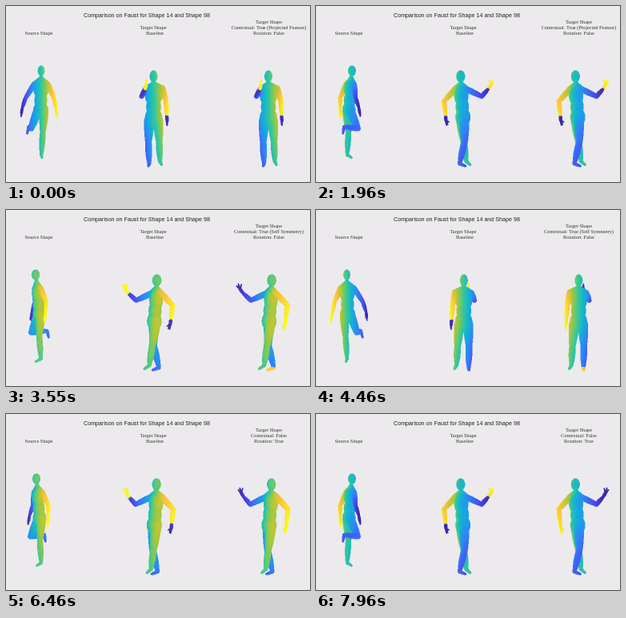
An HTML page with a canvas for the animation above (8000 ms loop, 380x220 px).

```html
<!DOCTYPE html>
<html lang="en">
<head>
<meta charset="utf-8">
<title>Shape comparison</title>
<style>
  html, body { margin: 0; width: 100%; height: 100%; overflow: hidden; background: #eceaec; }
  canvas, svg { position: absolute; left: 0; top: 0; width: 380px; height: 220px; }
  text { font: 6.38px "Liberation Serif", serif; fill: #333; text-anchor: middle; }
  .title { font: 7.16px "Liberation Sans", sans-serif; fill: #222; }
</style>
</head>
<body>
<canvas width="760" height="440"></canvas>
<svg viewBox="0 0 380 220">
  <text class="title" x="176" y="13.8">Comparison on Faust for Shape 14 and Shape 98</text>
  <text x="41" y="35.6">Source Shape</text>
  <text x="184" y="28.8">Target Shape</text>
  <text x="186" y="35.6">Baseline</text>
  <text x="328.5" y="22">Target Shape</text>
  <text id="contextual" x="328.5" y="28.8"></text>
  <text id="rotation" x="328.5" y="35.6"></text>
</svg>
<script>
const LOOP = 8000, TURN = 3000, FPS = 24, SS = 2;
const WIDTH = 380 * SS, HEIGHT = 220 * SS;

// Joints are [x, y, z]: x from the turning axis, y on screen, z towards the viewer at angle 0.
const striding = {
  scale: 0.88,
  head: [2.5, 81, 6], neck: [2.5, 90, 5], chest: [2.3, 104, 3], belly: [2, 118, 2], pelvis: [2, 130, 1],
  shoulderR: [-6.5, 98, 3], elbowR: [-17, 115, -2], wristR: [-21, 127, 0], palmR: [-22, 133, 0.5],
  tipR: [-22.5, 138, 1], indexR: [-22.5, 137, 2], thumbR: [-21, 135, 3],
  shoulderL: [11, 98, 3], elbowL: [18.5, 115, -1], wristL: [21, 128, 1], palmL: [22, 134, 2],
  tipL: [23, 140, 3], indexL: [22.5, 139, 4], thumbL: [21.5, 136, 5],
  hipR: [-3, 134, 1], kneeR: [-10, 153, 6], ankleR: [-13, 151, -17], toeR: [-15, 159, -20],
  hipL: [6, 134, 1], kneeL: [4.5, 157, 2], ankleL: [2.8, 186, -1], toeL: [3.5, 189.5, 6]
};
const reaching = {
  scale: 1,
  head: [0, 88, -4.5], neck: [0, 97, -4], chest: [0, 112, -3.5], belly: [0, 126, -2], pelvis: [0, 139, -1],
  shoulderR: [-9.5, 104, -2], elbowR: [-15, 113, 17], wristR: [-10.5, 104, 30], palmR: [-9.5, 99, 34.5],
  tipR: [-9, 95, 39.5], indexR: [-9.5, 92.5, 37], thumbR: [-9, 93, 33],
  shoulderL: [11, 103, -4], elbowL: [15.5, 119, -19], wristL: [16.5, 137, -16], palmL: [17, 143, -15],
  tipL: [17, 149, -14], indexL: [16.5, 148, -12.5], thumbL: [16, 145, -11],
  hipR: [-5.5, 143, -3], kneeR: [-6.5, 169, -3], ankleR: [-5.5, 197, -10], toeR: [-6.5, 200, -2],
  hipL: [5.5, 143, 0], kneeL: [7, 169, 5], ankleL: [8, 194, 9.5], toeL: [10, 198.5, 17]
};

const ellipsoids = [
  ["head", 4.9, 7.6, 5.9], ["chest", 10.8, 14, 8], ["belly", 9.3, 13, 7.8], ["pelvis", 10.8, 12, 8.8]
];
// start, end, start radius, end radius, bulge
const limbs = [
  ["neck", "shoulder", 3, 3.8, 0], ["shoulder", "elbow", 3.9, 2.9, 0.4], ["elbow", "wrist", 2.9, 1.9, 0.5],
  ["wrist", "palm", 1.9, 2.1, 0.2], ["palm", "tip", 1.7, 0.9, 0], ["palm", "index", 1.6, 0.8, 0],
  ["palm", "thumb", 1.4, 0.8, 0],
  ["hip", "knee", 6.3, 4.2, 0.5], ["knee", "ankle", 4, 2.4, 1], ["ankle", "toe", 2.5, 1.7, 0]
];

const mix = (a, b, t) => a + (b - a) * t;
const mixPoint = (p, q, t) => p.map((v, i) => mix(v, q[i], t));

// A body is a list of ellipsoids; "tint" is the lateral position of the same spot in the striding pose.
function buildBody(pose) {
  const k = pose.scale, balls = [];
  const add = (part, pos, radii, tint) => balls.push({ part, pos, radii: radii.map(r => r * k), tint });
  for (const [name, ...radii] of ellipsoids) add(name, pose[name], radii, striding[name][0]);
  add("neck", pose.neck, [3, 5, 3], striding.neck[0]);
  for (const side of "RL") {
    for (const [from, to, r0, r1, bulge] of limbs) {
      const start = from === "neck" ? from : from + side, end = to + side;
      const p = pose[start], q = pose[end];
      const steps = Math.ceil(Math.hypot(...p.map((v, i) => v - q[i])) / 0.9);
      const part = from === "wrist" || from === "palm" ? "hand" : end;
      for (let i = 0; i <= steps; i++) {
        const t = i / steps, r = mix(r0, r1, t) + bulge * Math.sin(Math.PI * t);
        add(part, mixPoint(p, q, t), [r, r, r], mix(striding[start][0], striding[end][0], t));
      }
    }
  }
  return { balls, tintScale: striding.scale / k };
}

const stops = [[62, 38, 168], [72, 82, 244], [46, 135, 247], [18, 177, 214],
  [55, 200, 151], [171, 199, 57], [254, 195, 56], [249, 251, 21]];
const palette = Uint32Array.from({ length: 256 }, (_, i) => {
  const s = i / 255 * (stops.length - 1), n = Math.min(Math.floor(s), stops.length - 2);
  const [r, g, b] = mixPoint(stops[n], stops[n + 1], s - n).map(Math.round);
  return (255 << 24 | b << 16 | g << 8 | r) >>> 0;
});
const REACH = 23;
const colorOf = x => palette[Math.max(0, Math.min(255, Math.round((x + REACH) / (2 * REACH) * 255)))];

const ctx = document.querySelector("canvas").getContext("2d");
const image = ctx.createImageData(WIDTH, HEIGHT);
const pixels = new Uint32Array(image.data.buffer);
const depth = new Float32Array(WIDTH * HEIGHT);

function drawBody({ balls, tintScale }, centerX, angle, { swapHands, oddToe } = {}) {
  const c = Math.cos(angle), s = Math.sin(angle);
  for (const { part, pos: [x, y, z], radii: [rx, ry, rz], tint } of balls) {
    const sx = centerX + x * c - z * s, sz = x * s + z * c;
    const p = 1 / (rx * rx), q = 1 / (rz * rz), reach = Math.max(rx, rz);
    const A = s * s * p + c * c * q, cross = s * c * (p - q), flat = c * c * p + s * s * q;
    let base = tint;
    if (part === "hand" && swapHands) base = -tint;
    if (part === "toeR" && oddToe) base = 16;
    const x1 = Math.ceil((sx + reach) * SS), y1 = Math.ceil((y + ry) * SS);
    for (let py = Math.floor((y - ry) * SS); py <= y1; py++) {
      const dy = (py + 0.5) / SS - y, rest = dy * dy / (ry * ry) - 1;
      if (rest > 0) continue;
      for (let px = Math.floor((sx - reach) * SS); px <= x1; px++) {
        const dx = (px + 0.5) / SS - sx, B = dx * cross;
        const disc = B * B - A * (dx * dx * flat + rest);
        if (disc < 0) continue;
        const dz = (Math.sqrt(disc) - B) / A, at = py * WIDTH + px;
        if (sz + dz <= depth[at]) continue;
        depth[at] = sz + dz;
        pixels[at] = colorOf(base + (dx * c + dz * s) * tintScale);
      }
    }
  }
}

const settings = [
  { contextual: "True (Projected Feature)", rotation: "False", swapHands: true },
  { contextual: "True (Self Symmetry)", rotation: "False", oddToe: true },
  { contextual: "False", rotation: "True" }
];
const stridingBody = buildBody(striding), reachingBody = buildBody(reaching);
const contextual = document.getElementById("contextual");
const rotation = document.getElementById("rotation");

function render(now) {
  const time = Math.floor((now % LOOP) * FPS / 1000 + 0.001) * 1000 / FPS;
  const angle = time / TURN * 2 * Math.PI;
  const setting = settings[Math.floor(time / TURN + 1e-6)];
  contextual.textContent = "Contextual: " + setting.contextual;
  rotation.textContent = "Rotation: " + setting.rotation;
  pixels.fill(0);
  depth.fill(-1e9);
  drawBody(stridingBody, 41.5, angle);
  drawBody(reachingBody, 184.5, angle, { swapHands: true });
  drawBody(reachingBody, 328, angle, setting);
  ctx.putImageData(image, 0, 0);
}

const begin = performance.now();
function tick() {
  render(performance.now() - begin);
  requestAnimationFrame(tick);
}
tick();
</script>
</body>
</html>
```
